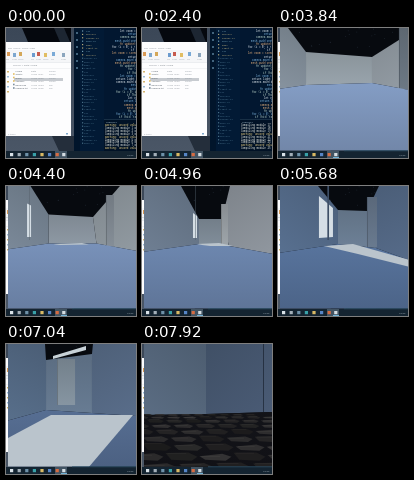
Animation, 130 px wide and 130 px high, one loop 8000 ms. Source, as an HTML page with a canvas:

```html
<!DOCTYPE html>
<html lang="en">
<meta charset="utf-8">
<style>
html, body { margin: 0; width: 100%; height: 100%; overflow: hidden; background: #07131f }
canvas { display: block; width: 130px; height: 130px }
</style>
<canvas width="130" height="130"></canvas>
<script>
const ctx = document.querySelector('canvas').getContext('2d');
const LOOP = 8000, GAME_START = 2640, PRINT_START = 1040;

// Camera poses: the room outline plus its openings and light patches.
const poses = [
  { t: 2640, top: [4, 22, 26, 88, 29, 134], edge: [61, 22, 56, 88, 55, 63],
    pillar: [115, 130, 0, 60], win: [-9, 8, -5, 9, -5, 50, -9, 50], lamp: [60, -9, 80, -9, 80, -6, 60, -6],
    patch: [40, 57, 75, 57, 75, 57, 40, 57, 40, 57], left: [128, 140, 151], back: [145, 155, 163],
    right: [140, 149, 156], post: [103, 114, 126], floor: [126, 149, 185], rock: 0 },
  { t: 3840, top: [10, 28, 24, 94, 29, 140], edge: [61, 28, 57, 94, 55, 62],
    pillar: [121, 130, 0, 61], win: [-9, 8, -5, 9, -5, 50, -9, 50], lamp: [60, -9, 80, -9, 80, -6, 60, -6],
    patch: [40, 58, 75, 57, 75, 57, 40, 58, 40, 58], left: [127, 139, 150], back: [146, 156, 164],
    right: [140, 149, 156], post: [103, 114, 126], floor: [124, 147, 184], rock: 0 },
  { t: 4960, top: [39, 57, 33, 80, 33, 88], edge: [66, 57, 58, 87, 60, 68],
    pillar: [79, 86, 18, 60], win: [51, 27, 55, 30, 55, 52, 51, 52], lamp: [60, -9, 80, -9, 80, -6, 60, -6],
    patch: [55, 58, 77, 57, 91, 60, 68, 60, 60, 59], left: [105, 120, 139], back: [122, 134, 146],
    right: [137, 144, 151], post: [151, 157, 162], floor: [103, 127, 165], rock: 0 },
  { t: 5680, top: [40, 60, 24, 89, 25, 101], edge: [67, 60, 58, 98, 62, 74],
    pillar: [89, 99, 11, 61], win: [41, 10, 55, 22, 55, 51, 41, 52], lamp: [60, -9, 80, -9, 80, -6, 60, -6],
    patch: [46, 60, 75, 58, 132, 74, 132, 81, 80, 68], left: [83, 106, 136], back: [103, 121, 142],
    right: [82, 102, 130], post: [100, 116, 136], floor: [83, 109, 148], rock: 0 },
  { t: 7040, top: [39, 40, 16, 86, 10, 87], edge: [77, 40, 66, 86, 69, 72],
    pillar: [51, 69, 15, 61], win: [-20, 0, -8, 4, -8, 50, -20, 52], lamp: [47, 12, 80, 2, 80, 6, 47, 15],
    patch: [2, 94, 45, 71, 127, 71, 82, 124, 2, 124], left: [83, 105, 131], back: [98, 117, 139],
    right: [85, 104, 131], post: [128, 142, 154], floor: [83, 106, 141], rock: 0 },
  { t: 7920, top: [64, 64, 0, 64, 0, 64], edge: [71, 64, 70, 64, 70, 68],
    pillar: [121, 122, 0, 68], win: [-20, 0, -8, 4, -8, 50, -20, 52], lamp: [51, -13, 80, -16, 80, -12, 51, -10],
    patch: [2, 150, 50, 130, 127, 130, 76, 150, 2, 150], left: [86, 103, 124], back: [80, 96, 118],
    right: [70, 87, 111], post: [48, 62, 82], floor: [18, 19, 24], rock: 1 }
];

const mix = (a, b, k) => Array.isArray(a) ? a.map((v, i) => mix(v, b[i], k)) : a + (b - a) * k;
const rgb = (c, k = 1) => `rgb(${c.map(v => Math.round(v * k))})`;
const hash = n => { const v = Math.sin(n * 127.1 + 3.7) * 43758.5453; return v - Math.floor(v); };

function rect(color, x, y, w, h) {
  ctx.fillStyle = color;
  ctx.fillRect(x, y, w, h);
}
function poly(color, ...p) {
  ctx.fillStyle = color;
  ctx.beginPath();
  for (let i = 0; i < p.length; i += 2) ctx.lineTo(p[i], p[i + 1]);
  ctx.fill();
}
function text(str, x, y, color, size = 2.6, font = 'Noto Sans Mono, monospace') {
  ctx.font = `${size}px ${font}`;
  ctx.fillStyle = color;
  ctx.fillText(str, x, y);
}
function fade(from, to, x0, y0, x1, y1) {
  const g = ctx.createLinearGradient(x0, y0, x1, y1);
  g.addColorStop(0, from);
  g.addColorStop(1, to);
  return g;
}
const shade = (top, bottom, y0, y1) => fade(top, bottom, 0, y0, 0, y1);

function explorer() {
  const sans = 'Open Sans, sans-serif';
  rect('#fdfdfe', 0, 14, 65, 94);
  text('File  Home  Share  View', 2, 21, '#8a929c', 2.5, sans);
  rect('#f5f6f8', 0, 22, 65, 12);
  [[1, '#d99a55'], [7, '#7da7cf'], [13, '#d4a758'], [26, '#6b9bce'], [31, '#c75b4e'],
   [38, '#e1bd62'], [46, '#79a9d6'], [56, '#8ba5bd']].forEach(([x, color], i) => {
    rect(color, x, 24 + i % 2, 3, 4);
    text(['Pin', 'Copy', 'Move'][i % 3], x - 1, 32, '#a0a7af', 2.2, sans);
  });
  rect('#dfe3e8', 0, 34, 65, .6);
  text('This PC > Data > build', 7, 38, '#777f87', 2.4, sans);
  rect('#e6e8eb', 0, 40, 65, .5);
  rect('#c7cbd0', 8, 50, 49, 3);
  ['Name', 'assets', 'levels', 'shaders', 'game.exe', 'readme.txt'].forEach((name, i) => {
    const y = 43.5 + i * 3.5;
    if (i) rect(i < 4 ? '#e4be61' : '#7b8d9d', 7, y - 1.8, 1.6, 1.6);
    text(name, 9.5, y, '#4f5963', 2.4, sans);
    text(i ? '12/04 10:3' + i : 'Date', 25, y, '#828991', 2.3, sans);
    text(i < 4 ? 'Folder' : 'File', 43, y, '#929aa2', 2.3, sans);
  });
  for (let i = 0; i < 5; i++) rect(i % 2 ? '#9bbbd9' : '#d5b46d', 1, 43 + i * 5, 2, 1.5);
  text('5 items', 2, 106.5, '#969da5', 2.2, sans);
  rect('#7fa8cc', 60, 105, 2, 1.5);
}

const code = ['let room = scene.add(wall);', 'for (i = 0; i < n; i++) {', '  mesh.push(vertex[i]);',
  'return light * normal;', '  if (hit) trace(ray);', 'fn update(state, dt) {', 'camera.move(dir);'];

function editor(t) {
  rect('#021a35', 68, 0, 62, 123);
  rect('#01152b', 68, 0, 6, 123);
  for (let i = 0; i < 6; i++) rect('#42647d', 70, 4 + i * 7, 2, 2);
  for (let i = 0; i < 34; i++) {
    const y = 4 + i * 3.4, color = i < 8 ? (i % 3 ? '#b5a878' : '#6d9bb0') : '#476f88';
    rect(color, 76, y - 1.6, 1.2, 1.2);
    text(['src', 'physics', 'render.rs', 'mesh.rs', 'maps', 'light.rs'][i % 6], i < 8 ? 80 : 78, y, color, 2.4);
  }
  ctx.save();
  ctx.beginPath();
  ctx.rect(98, 0, 32, 123);
  ctx.clip();
  rect('#021730', 98, 0, 32, 123);
  for (let i = 0; i < 28; i++) {
    const color = ['#e3ebf0', '#eab27c', '#7db5e0', '#c3dccf'][Math.floor(hash(i) * 4)];
    text(code[i * 3 % 7], 106 + Math.floor(hash(i + 40) * 5) * 4, 4 + i * 3.2, color);
  }
  rect('#011226', 98, 91, 32, 32);
  rect('#28445a', 98, 91, 32, .6);
  text('TERMINAL', 100, 94.5, '#a5bdca', 2.3);
  const extra = t < PRINT_START ? 0 : Math.floor((Math.min(t, 2400) - PRINT_START) / 80);
  for (let i = 0; i < 9; i++) {
    const n = i + extra;
    text(n % 4 ? 'Compiling module ' + n + ' ok' : 'warning: unused value', 99, 98 + i * 2.9,
      n % 4 ? '#eceee6' : '#ecd183');
  }
  ctx.restore();
}

function desktop(t) {
  rect(shade('#3b4757', '#4a5666', 0, 123), 0, 0, 130, 123);
  poly('#05080e', 16, 0, 65, 0, 65, 14, 22, 14);
  poly('#1d2632', 48, 0, 58, 0, 64, 14, 54, 14);
  poly('#242e3b', 46, 108, 68, 108, 68, 123, 53, 123);
  explorer();
  editor(t);
}

function rocks(alpha, phase) {
  ctx.globalAlpha = alpha;
  for (let row = 0, y = 70; y < 123; row++) {
    const h = 2 + row * 1.15;
    for (let i = 0; i < 9; i++) {
      const w = 13 + row * 3, x = i * w - hash(row) * w - phase, r = hash(row * 17 + i);
      const v = 27 + r * 24, d = r * h * .4;
      poly(rgb([v, v * .98, v]), x + 1, y + d, x + w * .7, y + d * .4, x + w - 1, y + h * .45,
        x + w * .8, y + h * .85, x + w * .2, y + h * .75);
      rect(rgb([v + 13, v + 12, v + 12]), x + 3, y + d, w * .55, .6);
    }
    y += h;
  }
  ctx.globalAlpha = 1;
}

function poseAt(t) {
  let i = 0;
  while (i < poses.length - 2 && t >= poses[i + 1].t) i++;
  const a = poses[i], b = poses[i + 1], k = Math.min(1, (t - a.t) / (b.t - a.t));
  return Object.fromEntries(Object.keys(a).map(key => [key, mix(a[key], b[key], k)]));
}

function game(t) {
  const p = poseAt(t);
  const [ax, bx, by, cx, cy, dx] = p.top, [ey, fx, fy, gx, gy, hy] = p.edge;
  ctx.save();
  ctx.beginPath();
  ctx.rect(2, 0, 128, 122.5);
  ctx.clip();
  rect('#070a0f', 2, 0, 128, 123);
  for (let i = 0; i < 22; i++) rect('#27313d', 20 + hash(i) * 95, hash(i + 70) * 24, .7, .7);
  poly('#c8d2d8', ...p.lamp);
  poly(shade(rgb(p.back, .94), rgb(p.back, 1.05), by, fy), bx, by, cx, cy, gx, gy, fx, fy);
  poly(fade(rgb(p.left, 1.06), rgb(p.left, .9), 0, ey, fx, 0), 0, 0, ax, 0, bx, by, fx, fy, 0, ey);
  poly(fade(rgb(p.right, .92), rgb(p.right, 1.05), gx, 0, 131, hy),
    cx, cy, dx, 0, Math.max(dx, 131), 0, 131, hy, gx, gy);
  const [x0, x1, y0, y1] = p.pillar;
  rect(shade(rgb(p.post, .9), rgb(p.post, 1.05), y0, y1), x0, y0, x1 - x0, y1 - y0);
  rect(rgb(p.post, .75), x0, y0, .7, y1 - y0);
  poly('#d5dee5', ...p.win);
  const [wx, , wr] = p.win;
  rect(rgb(p.left, .75), wx + (wr - wx) * .6, 0, (wr - wx) * .12, 54);
  poly(shade(rgb(p.floor, 1.06), rgb(p.floor, .92), 58, 122), 0, ey, fx, fy, gx, gy, 131, hy, 131, 123, 0, 123);
  poly('#bac4cc', ...p.patch);
  if (p.rock) rocks(p.rock, (7920 - t) / 60);
  ctx.restore();
}

function taskbar(playing) {
  rect('#142431', 0, 123, 130, 7);
  rect('#425463', 49, 123, 12, 7);
  ['#d9e2e8', '#a3afb9', '#6e91a9', '#39a1a8', '#d9b964', '#5685c6', '#d66c42', '#d5dde2'].forEach((color, i) => {
    rect(color, 4 + i * 7.6 - (i > 6 ? 1 : 0), 125, 3.2, 3.2);
  });
  if (playing) {
    rect('#70b3d8', 55, 129, 6, 1);
    rect('#315369', 66, 122.4, 64, .8);
  }
  text('10:42', 121, 128, '#bdc8d0', 2.5, 'Open Sans, sans-serif');
}

function draw(now) {
  const t = now % LOOP, playing = t >= GAME_START;
  desktop(t);
  if (playing) game(t);
  taskbar(playing);
  requestAnimationFrame(draw);
}
requestAnimationFrame(draw);
</script>
</html>
```
